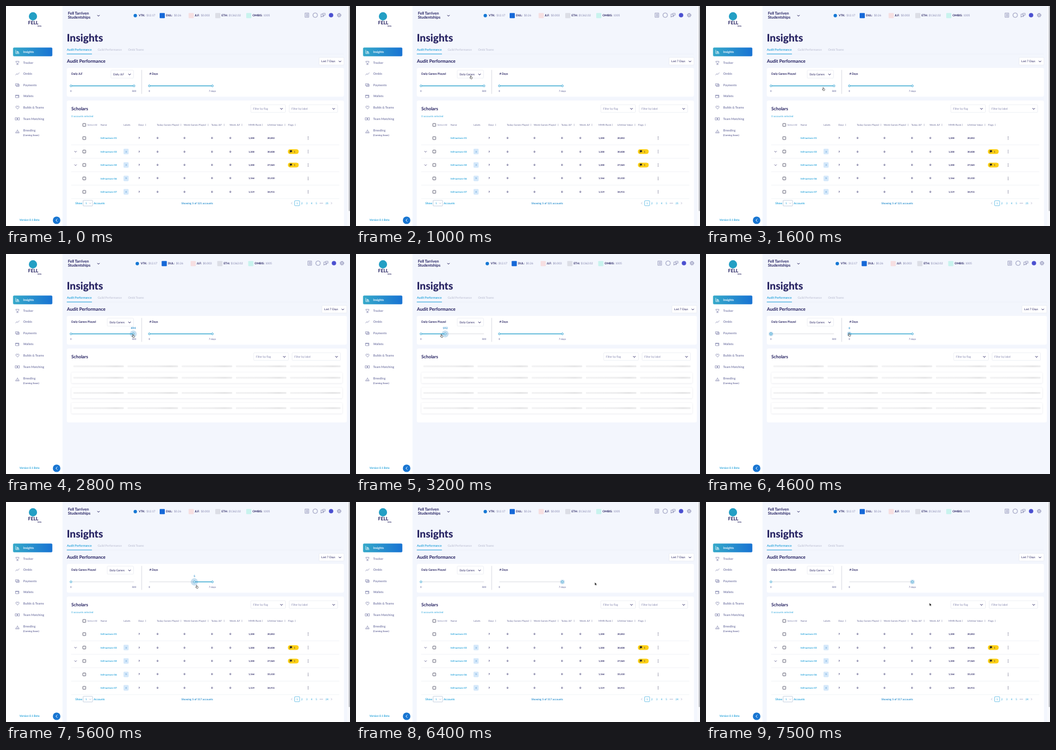
Write an HTML page that moves like this. It is 600 px wide and 384 px high and loops after 8 s.

```html
<!DOCTYPE html>
<html lang="en">
<head>
<meta charset="utf-8">
<title>Insights dashboard</title>
<style>
html, body { margin: 0; width: 100%; height: 100%; overflow: hidden; background: #f3f6fd; }
svg { display: block; width: 100vw; height: 100vh; }
text { font-family: Lato, "Open Sans", sans-serif; text-rendering: geometricPrecision; white-space: pre; }
</style>
</head>
<body>
<svg id="stage" viewBox="0 0 600 384" xmlns="http://www.w3.org/2000/svg">
  <defs>
    <linearGradient id="active"><stop stop-color="#35a9c9"/><stop offset="1" stop-color="#1873d3"/></linearGradient>
    <linearGradient id="bone"><stop stop-color="#f2f2f3"/><stop offset=".6" stop-color="#eeeeef"/><stop offset=".85" stop-color="#e5e5e6"/><stop offset="1" stop-color="#ececed"/></linearGradient>
    <filter id="soft" x="-5%" y="-30%" width="110%" height="160%"><feDropShadow dx="0" dy=".4" stdDeviation="1.1" flood-color="#8a8fa8" flood-opacity=".3"/></filter>
  </defs>
  <g id="sidebar"></g><g id="page"></g>
</svg>
<script>
const LOOP = 8000, STEP = 100;
const NAVY = '#211d5e', MUTED = '#8083ad', BLUE = '#27a3db', LINE = '#e3e6ef';
const $ = id => document.getElementById(id);

// Drawing helpers
const text = (x, y, s, size = 4.45, fill = NAVY, weight = 400, anchor = 'start') =>
  `<text x="${x}" y="${y}" font-size="${size}" fill="${fill}" font-weight="${weight}" text-anchor="${anchor}">${s}</text>`;
const bold = (x, y, s, size, fill = NAVY, anchor) => text(x, y, s, size, fill, 700, anchor);
const rect = (x, y, w, h, fill = '#fff', r = 0, extra = '') =>
  `<rect x="${x}" y="${y}" width="${w}" height="${h}" rx="${r}" fill="${fill}" ${extra}/>`;
const circle = (x, y, r, fill, extra = '') => `<circle cx="${x}" cy="${y}" r="${r}" fill="${fill}" ${extra}/>`;
const path = (d, stroke = NAVY, width = .7, fill = 'none', extra = '') =>
  `<path d="${d}" stroke="${stroke}" stroke-width="${width}" fill="${fill}" stroke-linecap="round" stroke-linejoin="round" ${extra}/>`;
const at = (x, y, s) => `<g transform="translate(${x} ${y})">${s}</g>`;
const chevron = (x, y, width = 1) => path(`M${x - 1.7} ${y - .9}l1.7 1.8l1.7-1.8`, NAVY, width);
const hline = (x1, x2, y, color = LINE, w = .5) => path(`M${x1} ${y}H${x2}`, color, w);
const select = (x, y, w, h, label, color = NAVY, weight = 400) =>
  rect(x, y, w, h, '#fff', 1.5, `stroke="${LINE}" stroke-width=".6"`) +
  text(x + 4, y + h / 2 + 1.6, label, 4.8, color, weight) + chevron(x + w - 7, y + h / 2 + .5);

// Motion helpers
const lerp = (a, b, k) => a + (b - a) * k;
function track(keys, t) {
  const i = keys.findIndex(k => k[0] > t);
  if (i < 0) return keys[keys.length - 1].slice(1);
  if (i === 0) return keys[0].slice(1);
  const a = keys[i - 1], b = keys[i], k = (t - a[0]) / (b[0] - a[0]);
  return a.slice(1).map((v, n) => lerp(v, b[n + 1], k));
}
const between = (t, a, b) => t >= a && t < b;

const MENU = [
  ['Insights', 80, 'M-3-3V3H3M-1 2V-1H.5V2M.5 0H2V2'],
  ['Tracker', 99, 'M-2.5-2.5H2.5V-1Q2 1 0 1.3Q-2 1-2.5-1ZM0 1.3V3M-1.6 3H1.6'],
  ['Ombis', 118.5, 'M-3 2L-1-.5L.5 1L3-2'],
  ['Payments', 138, 'M-3-2.3H2V1H-3ZM-2 1V2.3H3V-1H2M-1-.7H1'],
  ['Wallets', 157.5, 'M-3-2H2.5V2.5H-3ZM-3-1H2.5M1 .7H2.5'],
  ['Builds &amp; Teams', 177, 'M0 2.8L-2.7 0Q-3.4-2.4-1.4-2.5Q0-2.4 0-1.2Q0-2.4 1.4-2.5Q3.4-2.4 2.7 0Z'],
  ['Team Matching', 197, 'M-3.5-2H-.8V2H-3.5ZM.8-2H3.5V2H.8ZM-.8 0H.8'],
  ['Breeding', 219, 'M-3 2.5H3L2 0Q0-3-2 0ZM0-1.5V-3M-1 1H1']
];

function drawSidebar() {
  let s = rect(0, 0, 98.5, 384) + circle(47, 18, 7.2, '#239fc4') +
    bold(47.5, 31.6, 'FELL', 8.2, NAVY, 'middle') + bold(55, 36, 'beta', 3.4) +
    rect(12.3, 72.6, 68.5, 15.2, 'url(#active)', 1.8);
  MENU.forEach(([label, y, icon], i) => {
    const color = i ? MUTED : '#fff';
    s += at(20, y, path(icon, color, .7)) + bold(30, y + (i === 7 ? 0 : 1.7), label, 5.4, color);
  });
  s += bold(30, 227, '(Coming Soon)', 4.3, '#6a6b9c') + text(23.5, 375, 'Version 0.1 Beta', 4.8, BLUE, 700);
  s += circle(88.3, 374, 6.6, '#1976d2') + path('M89.3 371.7L87 374L89.3 376.3', '#fff', .9);
  $('sidebar').innerHTML = s;
}

// Label, value, icon x, label x, value x, icon colour
const TICKERS = [
  ['VTK:', '$12.17', 225.5, 231.5, 245, '#1477d4'],
  ['DUL:', '$0.26', 272.5, 279, 293, '#1668d8'],
  ['JLF:', '$0.003', 323, 329, 340, '#f6dfe1'],
  ['ETH:', '$1362.02', 369.5, 376, 388.5, '#dcdee6'],
  ['OMBIS:', '1005', 423.5, 430, 449, '#c9f3ee']
];

function header(shift) {
  let s = bold(108, 14.6, 'Fell Tarriven', 6.8) + bold(108, 22.4, 'Studentships', 6.8) + chevron(161.3, 17, 1);
  const dx = shift * .7;
  TICKERS.forEach(([name, value, ix, lx, vx, color], i) => {
    s += (i ? rect(ix + dx - 4.5, 12.2, 9, 9, color, 1) : circle(ix + dx, 16.7, 3, color)) +
      bold(lx + dx, 18.3, name, 4.9) + text(vx + dx, 18.3, value, 4.9, MUTED);
  });
  s += at(525 + shift, 16, path('M-3-3.7H3V3.7H-3ZM-1.5-1.7H1.5M-1.5 0H1.5M-1.5 1.7H1.5', MUTED, .7));
  s += circle(539.3 + shift, 16, 4, 'none', `stroke="${MUTED}" stroke-width=".8"`);
  s += at(553 + shift, 16, path('M-3.5 3.5V-2H-1M-3.5 2.5H1V-.5M0-3.2H3.7V0H1L0 1Z', MUTED, .7));
  s += circle(567 + shift, 16, 3.8, '#4a4fd0');
  s += at(581 + shift, 16, circle(0, 0, 2.6, 'none', `stroke="${MUTED}" stroke-width=".9"`) +
    circle(0, 0, 3.4, 'none', `stroke="${MUTED}" stroke-width=".8" stroke-dasharray="1.3 1.37"`) +
    circle(0, 0, .9, MUTED));
  return s;
}

function headings(shift) {
  return text(106, 61.6, 'Insights', 18.2, NAVY, 800) +
    bold(106.3, 77.6, 'Audit Performance', 5.15, BLUE) +
    bold(160, 77.6, 'Guild Performance', 5.05, '#c3c6d8') + bold(213, 77.6, 'Ombi Teams', 5, '#c3c6d8') +
    hline(106, 589 + shift, 84, '#e6eaf3') + hline(106.5, 149.5, 83.8, BLUE, 1) +
    bold(106.3, 98.7, 'Audit Performance', 8) +
    select(546 + shift, 89.7, 43.5, 13.3, 'Last 7 Days');
}

function thumb(x, halo) {
  return (halo ? circle(x, 139.4, halo, '#1f7fc4', 'opacity=".25"') : '') +
    circle(x, 139.4, 1.6, '#fff', 'stroke="#2b9fd0" stroke-width=".9"');
}

function slider(x, low, high, lowHalo, highHalo, maxLabel) {
  const end = x + 110, a = lerp(x, end, low), b = lerp(x, end, high);
  return rect(x, 138.8, 110, 1.2, '#e1e3e8', .6) + rect(a, 138.8, b - a, 1.3, '#2ba4cf') +
    thumb(a, lowHalo) + (a !== b || highHalo ? thumb(b, highHalo) : '') +
    bold(x, 149.8, '0', 4.4, MUTED, 'middle') + bold(end, 149.8, maxLabel, 4.4, MUTED, 'middle');
}

function filters(t, shift) {
  const games = t >= 1000;
  const amount = t < 2800 ? 500 : track([[2800, 494], [2900, 480], [3400, 0]], t)[0];
  const days = Math.round(track([[5100, 0], [5600, 5], [5900, 7]], t)[0]);
  const amountHalo = between(t, 2800, 3500) ? 6 : between(t, 3500, 5100) ? 4 : 0;
  const daysHalo = between(t, 5100, 6100) ? 6.3 : between(t, 4200, 5100) || t >= 6100 ? 4 : 0;
  let s = rect(106, 108, 483.5 + shift, 50.3, '#fff', 3) +
    bold(114, 120, games ? 'Daily Games Played' : 'Daily JLF', 4.9) +
    (games ? select(176.5, 112, 46, 14, 'Daily Games') : select(183, 112, 39.5, 14, 'Daily JLF')) +
    path('M236.7 112V153', '#c9ccd6', .7) + bold(250.3, 120, '# Days', 4.9);
  s += slider(113.3, 0, amount / 500, 0, amountHalo, '500') + slider(250, days / 7, 1, daysHalo, 0, '7 days');
  if (between(t, 2800, 3500))
    s += bold(113.3 + amount * .22, 131.3, Math.round(amount), 4.9, '#2389c9', 'middle');
  if (between(t, 4200, 6100))
    s += bold(250 + days * 110 / 7, 131.3, days, 4.6, '#2389c9', 'middle');
  return s;
}

const scholarBar = shift => bold(114, 181.6, 'Scholars', 7.8) +
  select(427 + shift, 172.3, 60.5, 13.5, 'Filter by flag', MUTED) +
  select(494 + shift, 172.3, 84.5, 13.5, 'Filter by label', MUTED);

function skeleton() {
  let s = rect(106, 165, 488.5, 129, '#fff', 3) + scholarBar(5);
  [196, 216, 242.6, 269].forEach((y, row) => {
    if (row) s += rect(114, y - 9.3, 472.5, 18.8, '#fff', 2, 'filter="url(#soft)"');
    for (let c = 0; c < 5; c++) s += rect(117.5 + c * 94.5, y - 1.5, 88, 3, 'url(#bone)', 1);
  });
  return s;
}

// Column title, text x, sort mark x
const COLUMNS = [
  ['Name', 165], ['Labels', 205], ['Days', 231, 243.5], ['Today Games Played', 263, 305],
  ['Week Games Played', 310, 352.5], ['Today JLF', 358, 380.5], ['Week JLF', 390, 411.5],
  ['MMR/Rank', 423, 447], ['Lifetime Value', 456, 486.5], ['Flags', 492, 504.5]
];
// Scholar id, labels, rank, lifetime value, flagged
const ROWS = [
  ['01', '', '1,200', '20,852'], ['03', 3, '1,200', '30,838', true], ['04', 3, '1,200', '27,065', true],
  ['06', 5, '1,166', '33,410'], ['07', 4, '1,119', '34,911']
];
const checkbox = y => rect(134, y - 2.5, 5, 5, '#fff', .5, 'stroke="#44445c" stroke-width=".8"');

function table(t) {
  const after = t >= 5300;
  let s = rect(106, 165, 483.5, 222, '#fff', 3) + scholarBar(0) +
    text(114, 194, '0 accounts selected', 4.45, BLUE) + checkbox(207.6) + text(142, 209, 'Select All', 4.2, MUTED);
  for (const [title, x, sort] of COLUMNS) {
    s += text(x, 209, title, 4.3, '#6c6e9a');
    if (sort) s += at(sort, 207.6, path('M-.9-.6L0-1.6L.9-.6ZM-.9 .6L0 1.6L.9 .6Z', 'none', 0, '#7d80a3'));
  }
  ROWS.forEach(([id, labels, rank, value, flagged], i) => {
    const y = 230.6 + i * 23.45, base = y + 1.5;
    s += checkbox(y) + text(165, base + .2, 'fell-tarriven-' + id, 4.2, BLUE, 700);
    if (labels) s += rect(205, y - 4.8, 8.8, 9.6, '#d4e8fa', 1.4) + text(209.4, base, labels, 4.2, '#3585c8', 400, 'middle');
    if (flagged) {
      s += chevron(121.3, y + .3, .6) + rect(491.7, y - 4.1, 18.8, 8.3, '#fdd016', 4.1);
      s += path(`M495.3 ${y + 2.3}V${y - 2}H499L498.2 ${y - .7}L499 ${y + .6}H495.3`, '#222', .5, '#222') + text(502, base, '1', 4.2);
    }
    s += text(231, base, '7', 4.3, NAVY, 700);
    for (const x of [263, 310, 358, 390]) s += text(x, base, '0', 4.5, NAVY, 700);
    s += text(423, base, rank, 4, NAVY, 700) + text(456, base, value, 4, NAVY, 700);
    for (const d of [-2.2, 0, 2.2]) s += circle(527, y + d, .6, '#45456b');
    s += hline(114, 581, y + 11.75);
  });
  s += bold(121, 345.7, 'Show', 4.9, BLUE) + rect(134.5, 339.2, 16.5, 9.8, '#fff', .8, 'stroke="#8fa6c4" stroke-width=".5"') +
    text(138.5, 345.7, '5', 4.6, BLUE) + path('M145.4 343.8l1.3 1.3l1.3-1.3', MUTED, .5) +
    bold(153, 345.7, 'Accounts', 4.7, BLUE) +
    bold(306, 345.7, `Showing 5 of ${after ? 117 : 121} accounts`, 4.6, '#2b8fce');
  s += path('M498.8 342.8L497.6 344.2L498.8 345.6M567.2 342.8L568.4 344.2L567.2 345.6', MUTED, .5) +
    rect(503.5, 339.8, 8.6, 8.8, '#fff', .8, `stroke="${BLUE}" stroke-width=".6"`);
  [1, 2, 3, 4, 5].forEach((n, i) => s += text(507.8 + i * 8.4, 345.8, n, 4.6, BLUE, 400, 'middle'));
  for (const x of [548, 550, 552]) s += circle(x, 344.2, .6, MUTED);
  return s + text(559.8, 345.8, after ? 24 : 25, 4.6, BLUE, 400, 'middle');
}

const scrollbar = () => rect(595, 0, 5, 384, '#f8f9fc') + rect(597.7, 0, 2.3, 358, '#bfc1c6', 1);

const CURSOR = [
  [200, 196, 119], [900, 200, 121], [1600, 205, 145], [2100, 205, 145], [2500, 222, 143], [2800, 222, 143],
  [3400, 113, 143], [3600, 114, 142], [3900, 266, 132], [4200, 250, 141], [5100, 250, 141],
  [5600, 333, 148], [5900, 362, 148], [6100, 364, 147], [6400, 418, 143], [6500, 418, 143], [6700, 391.3, 179]
];

function cursor(t) {
  if (t < 200) return '';
  const [x, y] = track(CURSOR, t);
  const arrow = between(t, 3700, 4100) || t >= 6200;
  return at(x, y, arrow
    ? path('M-1.5-2.8V2.4L-.3 1.3L.6 3.1L1.4 2.8L.6 1.1H2.1Z', '#fff', .3, '#111')
    : path('M-1-2.6Q-.5-3.1 0-2.6V-.8L1.8-.3Q2.3 0 2.1 .9L1.6 2.7H-.6L-2.2 .5Q-2 .1-1 .7Z', '#222', .6, '#fff'));
}

function render(t) {
  const loading = between(t, 1100, 1500) || between(t, 2800, 3700) || between(t, 4200, 5300);
  const shift = loading ? 5 : 0;
  $('page').innerHTML = header(shift) + headings(shift) + filters(t, shift) +
    (loading ? skeleton() : table(t) + scrollbar()) + cursor(t);
}

let shown = -1;
function tick() {
  const t = Math.floor(performance.now() % LOOP / STEP) * STEP;
  if (t !== shown) render(shown = t);
  requestAnimationFrame(tick);
}
drawSidebar();
tick();
</script>
</body>
</html>
```
